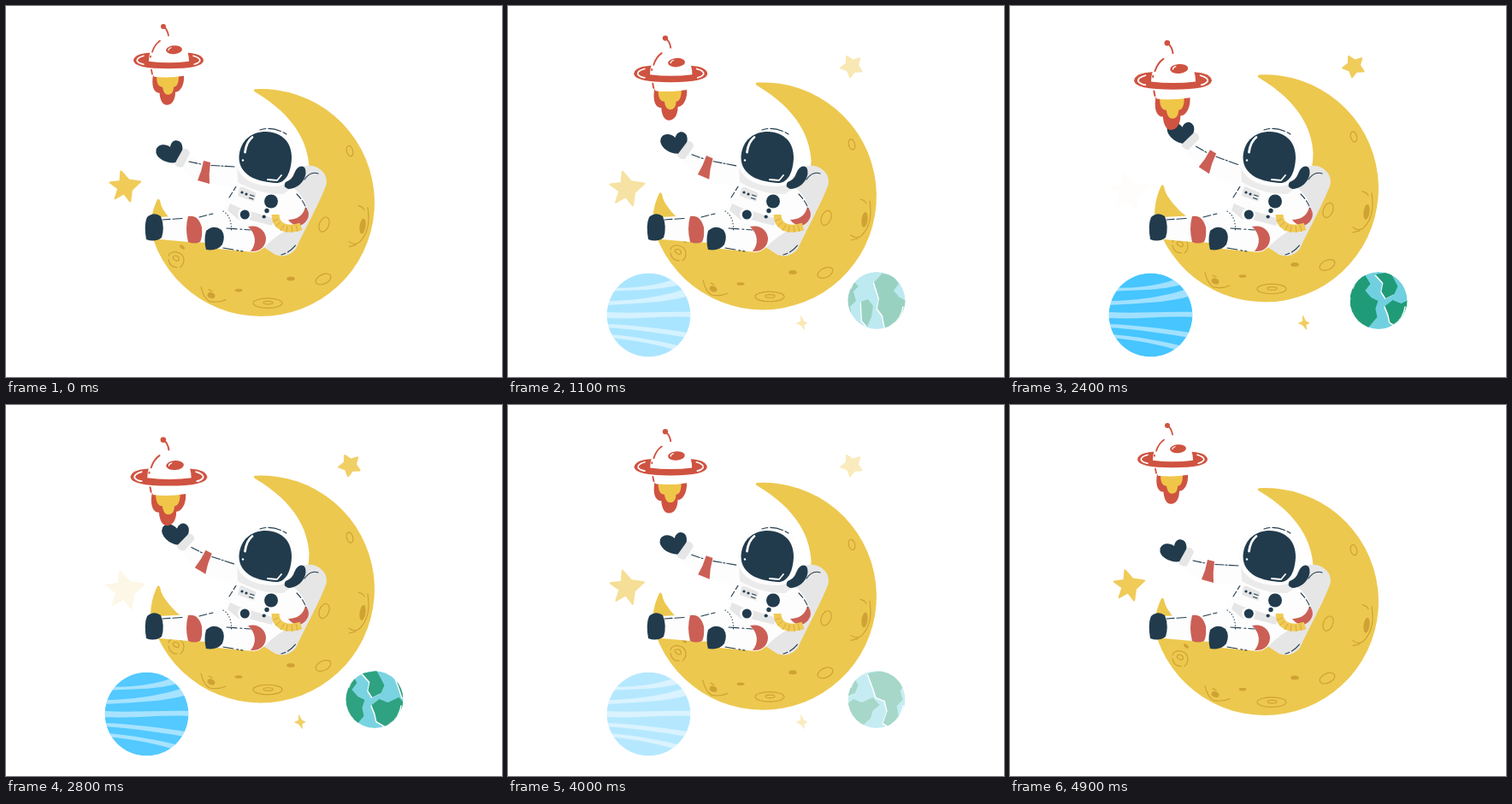
Write an HTML page that moves like this. It is 580 by 434 pixels and loops after 5000 ms.

```html
<!DOCTYPE html>
<html lang="en">
<head>
<meta charset="utf-8">
<title>Astronaut on the moon</title>
<style>
  html, body { margin: 0; width: 100%; height: 100%; overflow: hidden; background: #fff; }
  svg { display: block; width: 100vw; height: 100vh; }
  .ink { fill: #213b4d; }
  .red { fill: #cb5f55; }
  .grey { fill: #e6e6e6; }
  .suit { fill: #fdfdfd; }
  .line { fill: none; stroke: #213b4d; stroke-width: 1.1; stroke-linecap: round; }
  .rim { fill: none; stroke: #cfa233; stroke-width: 1.2; stroke-linecap: round; }
  .pit { fill: #cfa233; }
  .shine { fill: none; stroke: #fff; stroke-linecap: round; stroke-linejoin: round; }
  .hull { fill: #cf5341; }
  .trim { fill: none; stroke: #cf5341; stroke-width: 1.8; stroke-linecap: round; }
  .star { fill: #f0cb58; stroke: #f0cb58; stroke-width: 2; stroke-linejoin: round; }
  .small { stroke-width: .8; }
</style>
</head>
<body>
<svg viewBox="0 0 580 434">
  <defs>
    <clipPath id="blueClip"><circle cx="164.5" cy="361.5" r="49"/></clipPath>
    <clipPath id="earthClip"><circle cx="431" cy="344.5" r="33.5"/></clipPath>
    <g id="lands">
      <path d="M-2 314 L14 311 L31 312 L36 322 L42 328 L36 334 L39 345 L32 352 L34 364 L24 377 L16 372 L21 358 L18 346 L8 342 L4 330 Z"/>
      <path d="M45 346 L53 343 L59 351 L57 364 L52 375 L46 368 Z"/>
      <path d="M60 323 L69 313 L83 315 L89 325 L83 333 L90 341 L98 345 L95 354 L97 364 L86 377 L73 377 L70 362 L64 354 L66 342 Z"/>
      <path d="M95 314 L112 311 L117 320 L121 328 L117 337 L107 342 L102 334 L104 324 Z"/>
      <path d="M106 351 L115 344 L125 348 L138 342 L146 351 L138 358 L135 367 L124 377 L112 370 L110 361 Z"/>
    </g>
  </defs>

  <g id="sky">
    <g clip-path="url(#blueClip)">
      <circle cx="164.5" cy="361.5" r="49" fill="#42c4ff"/>
      <g fill="#9fe1ff">
        <path d="M120 330 C150 330 178 327 200 317 L206 324 C182 333 150 332 117 334 Z"/>
        <path d="M113 345 C150 345 188 339 215 328 V338 C188 347 150 348 113 350 Z"/>
        <path d="M114 358 C145 360 180 357 215 358 V364 C180 362 150 367 114 365 Z"/>
        <path d="M114 372 C145 373 185 378 215 383 V389 C185 384 150 378 114 376 Z"/>
        <path d="M118 384 C145 386 180 392 206 399 L200 404 C180 397 150 391 118 388 Z"/>
      </g>
    </g>
    <g clip-path="url(#earthClip)">
      <circle cx="431" cy="344.5" r="33.5" fill="#6dcfdf"/>
      <g id="globe"></g>
      <path class="shine" stroke-width="1.5" d="M401 330 Q405 318 414 313 M462 352 Q460 366 449 373"/>
    </g>
    <path id="starRight" class="star"/>
    <path class="star small" d="M342.5 362.5 L345.6 368.6 L350 371 L346 372.8 L346.5 378.5 L342.6 373.4 L337.5 371 L342.4 369 Z"/>
  </g>

  <path id="starLeft" class="star"/>

  <g id="moon">
    <path fill="#edc84f" d="M291 96.6 A133 133 0 1 1 169 262 C169 248 172 236 177 226 Q178.5 224 180 227 Q181 233 184 238 A93 93 0 0 0 262 281 A93 93 0 0 0 354.500 188 C353 160 338 128 292 100.500 Q288 98 291 96.600 Z"/>
    <g class="rim">
      <ellipse cx="402" cy="169" rx="3.6" ry="6.3" transform="rotate(-15 402 169)"/>
      <ellipse cx="372" cy="255" rx="5.5" ry="9" transform="rotate(22 372 255)"/>
      <ellipse cx="371" cy="319" rx="9.5" ry="5.5" transform="rotate(-25 371 319)"/>
      <ellipse cx="306" cy="347" rx="17" ry="5.8"/>
      <ellipse cx="306.5" cy="346.5" rx="5.5" ry="1.8"/>
      <path d="M412 233 Q417 234 419 238 M423 235 C425 250 425 264 413 276 Q407 280 401 275 M401 281 L409 279"/>
      <path d="M228 328 Q231 341 238 345 Q248 347 257 343 M237 331 L241 333"/>
      <path d="M190 292 C192 284 207 286 208 296 Q208 302 204 305 M190 296 C191 302 195 305 200 305 M195 294 C196 289 204 292 202 297 Q199 299 195 294"/>
    </g>
    <g class="pit">
      <ellipse cx="417" cy="257" rx="3.5" ry="9" transform="rotate(8 417 257)"/>
      <ellipse cx="333" cy="318.5" rx="4.8" ry="2.5"/>
      <ellipse cx="272" cy="332" rx="4.5" ry="1.8"/>
      <ellipse cx="240" cy="338" rx="4.6" ry="3.3" transform="rotate(25 240 338)"/>
      <ellipse cx="206" cy="281.5" rx="3.5" ry="1.8" transform="rotate(40 206 281.5)"/>
    </g>
  </g>

  <g id="pack">
    <path class="grey" d="M338 192 Q351 184 362 188 Q377 195 374.5 209 C367 230 349 262 339 284 Q329 296 315 291 L298 280 Z"/>
    <path class="line" d="M322 291 Q333 288 340 278" stroke-dasharray="5 3 12 4"/>
    <path class="line" d="M349 203 Q356 193 365 196"/>
  </g>

  <g id="body">
    <path class="suit" d="M272 200 Q262 215 256 234 L252 262 L300 284 Q322 262 340 258 Q354 252 353 240 Q350 226 340 216 L326 206 Z"/>
    <path class="suit" d="M178 247 L238 244 L260 235 L272 262 L238 277 L213 276 L180 273 Z"/>
    <path class="suit" d="M246 261 L290 256 Q304 262 304 274 Q302 287 290 288 L248 284 Z"/>
    <path class="grey" d="M262 231 L273 236 L286 240 L314 249 L311 257 L284 250 L272 250 L259 239 Z"/>
    <circle class="suit" cx="279" cy="244" r="8"/>
    <circle class="ink" cx="279.3" cy="244" r="5.5"/>
    <path class="grey" d="M275 211 L291 218 Q293 219 292 222 L290 229 L271 222 L273 213 Z"/>
    <circle class="ink" cx="276" cy="218" r="1.6"/>
    <circle class="ink" cx="281" cy="220" r="1.6"/>
    <path class="line" d="M285.5 221 L290 222.5 M284.5 224.5 L289 226"/>
    <circle class="ink" cx="310" cy="228.5" r="8"/>
    <circle class="ink" cx="305" cy="239.5" r="2.7"/>
    <circle class="ink" cx="301.7" cy="246.5" r="2.1"/>
    <path class="red" d="M330 250 C340 250 348 245 350 235 Q355 240 353.5 247 C349 259 337 260 330 250 Z"/>
    <path fill="none" stroke="#f0ca55" stroke-width="9" d="M315 244 C315 257 326 264 345 258"/>
    <path fill="none" stroke="#d3a73c" stroke-width=".9" d="M312 252 L318 249 M315 258 L321 253 M321 263 L325 256 M328 265 L329 257 M335 265 L334 257 M341 264 L339 256"/>
    <path class="line" d="M340 220 Q348 228 351 237" stroke-dasharray="7 3"/>
    <path class="line" d="M271 208 L261 224" stroke-dasharray="9 3"/>
    <path class="line" d="M254 240 Q264 246 263.5 263" stroke-dasharray=".5 3"/>
    <path class="line" d="M183 250 L206 248.5 M226 247 L242 243" stroke-dasharray="9 3 14 3"/>
    <path class="line" d="M258 260 L286 262 M254 283 L277 287" stroke-dasharray="12 4 2 3"/>
    <path class="red" d="M213 246 Q225 244 229 259 Q230 270 227 276 Q220 279 213 276 Q209 260 213 246 Z"/>
    <path class="red" d="M283 258 C296 255 304 264 304 272 C304 281 297 288 286 287 C293 279 293 267 283 258 Z"/>
    <path class="ink" d="M165 247 Q173 240 181 246 Q186 258 182 271 Q174 277 164 273 Q161 256 165 247 Z"/>
    <path class="ink" d="M234 263 Q243 255 252 262 Q257 269 253 279 Q247 287 234 285 Q231 274 234 263 Z"/>
  </g>

  <g id="arm">
    <path class="suit" d="M207 170 L229 183 L277 185 L280 212 L238 209 L224 205 L199 187 Z"/>
    <path class="ink" d="M175.5 168 C178 161 187 161 192 165 C193 158 198 156 202 158 C207 160 207 168 206 173 L199 183 C190 185 178 180 175.5 172 Z"/>
    <path class="grey" d="M207 167 Q213 166 215 172 L207 188 Q201 190 197 185 Z"/>
    <path class="red" d="M231 181 L239 183 Q237 196 238 208 L224 204 Q229 193 231 181 Z"/>
    <path class="line" d="M214 182 L228 185 M240 186.5 L267 188" stroke-dasharray="10 2 2 2 16 3"/>
  </g>

  <g id="head">
    <path fill="#ebebeb" d="M270 186 L271 206 C284 214 306 221 324 220 L342 208 L340 192 Z"/>
    <path class="suit" d="M268 176 C270 154 284 143 304 143 C326 143 340 157 340 178 C340 198 330 211 314 211 C290 211 268 202 268 176 Z"/>
    <path class="ink" d="M272.5 176 C274 157 287 147 304 147 C323 148 334 159 334 178 C333 197 326 207 316 207 C297 206 272 200 272.5 176 Z"/>
    <path class="shine" stroke-width="2.8" d="M279.5 171 Q281 159 288 153.5"/>
    <circle fill="#fff" cx="277" cy="180.5" r="1.2"/>
    <path class="shine" stroke-width="1.8" d="M306 203 L317 204 L322 198"/>
    <path class="line" d="M297 145 Q312 140 328 150" stroke-dasharray="7 3 15 3"/>
    <path class="ink" d="M345 187.5 Q351 187 350.5 196 C349 207 339 214 330 214 Q323 211 327 206 Q335 203 337 196 Q340 188 345 187.5 Z"/>
  </g>

  <g id="ufo">
    <path class="hull" d="M172 81 C170 92 172 102 179.500 102 C180 110 183 116 188 116 C194 116 198 110 198 101 C204 101 209 92 208 81 Z"/>
    <path fill="#f0c649" d="M176 82 C176 90 178 95 183 95 C184 101 186 104 189.5 104 C194 104 196 100 196 95 C200 95 202 90 202 82 Z"/>
    <path fill="#fff" d="M169 72 H211 L208 82 Q190 85 173 83 Z"/>
    <path class="trim" d="M170 75 L171 80"/>
    <path class="hull" d="M149 64 Q150 56 168 55 H212 Q230 56 231 64 Q230 73.500 190 73.500 Q150 73.500 149 64 Z"/>
    <path class="shine" stroke-width="1.6" d="M161 58.500 Q152 61 153.500 65 Q156 68 161 68.500 M219 58.500 Q228 61 226.500 65 Q224 68 220 68.500"/>
    <path fill="#fff" d="M167 65 Q167 42 190 40 Q214 42 214 65 Q190 68 167 65 Z"/>
    <path class="trim" d="M171 54 Q174 45 180 41 M169 59 L169 60"/>
    <ellipse class="hull" cx="196.5" cy="51.5" rx="9.5" ry="5" transform="rotate(-4 196.5 51.5)"/>
    <path class="shine" stroke-width="1.2" d="M190 52 Q190 50 193 49"/>
    <path class="trim" d="M184.5 24.5 Q189 28 190 35"/>
    <circle class="hull" cx="184" cy="24.3" r="3"/>
  </g>
</svg>
<script>
  const LOOP = 5000, STEP = 100, HALF = 2450, END = 4900;
  const GLOBE_SPAN = 134;
  const $ = id => document.getElementById(id);
  const place = (id, value) => $(id).setAttribute('transform', value);
  const ramp = (t, from, to) => Math.min(1, Math.max(0, (t - from) / (to - from)));

  // Star around the origin with tips at the given angles.
  function star(angles, radius, inner) {
    const point = (deg, r) => {
      const a = deg * Math.PI / 180;
      return (r * Math.cos(a)).toFixed(2) + ' ' + (r * Math.sin(a)).toFixed(2);
    };
    const points = angles.flatMap((a, i) => {
      const next = i + 1 < angles.length ? angles[i + 1] : angles[0] + 360;
      return [point(a, radius), point((a + next) / 2, inner)];
    });
    return 'M' + points.join('L') + 'Z';
  }

  $('starLeft').setAttribute('d', star([-106, -17, 72, 130, 194], 18.5, 8.5));
  $('starRight').setAttribute('d', star([-117, -45, 27, 99, 171], 13, 7));
  place('starRight', 'translate(402 70.5)');

  // Repeated land strip; a white offset copy forms the coast.
  $('globe').innerHTML = [-GLOBE_SPAN, 0, GLOBE_SPAN].map(x =>
    `<use href="#lands" x="${x - 1.2}" y="1" fill="#fff"/>` +
    `<use href="#lands" x="${x}" fill="#1b9975"/>`).join('');

  function ufoDrop(t, p) {
    return t > HALF ? 24 * p : 11.8 * ramp(t, 0, 500) + 12.2 * ramp(t, 500, HALF);
  }

  function draw(t) {
    const p = ramp(t, 0, HALF) - ramp(t, HALF, END);
    const fade = ramp(t, 0, HALF) - ramp(t, 2600, END);
    place('moon', `translate(0 ${0.6 - 17 * p})`);
    place('arm', `rotate(${17.3 * p} 275 185)`);
    place('ufo', `translate(${190 + 0.5 * p} ${64.2 + ufoDrop(t, p)}) scale(${1 + 0.11 * p}) translate(-190 -64.5)`);
    place('starLeft', `translate(139.5 ${211 + 6 * p}) scale(${1 + 0.27 * p})`);
    $('starLeft').setAttribute('opacity', 1 - p);
    $('sky').setAttribute('opacity', fade);
    place('globe', `translate(${398 - GLOBE_SPAN * (t / END % 1)} 0)`);
  }

  const start = performance.now();
  function tick() {
    const t = (performance.now() - start) % LOOP;
    draw(Math.floor(t / STEP) * STEP);
    requestAnimationFrame(tick);
  }
  tick();
</script>
</body>
</html>
```
